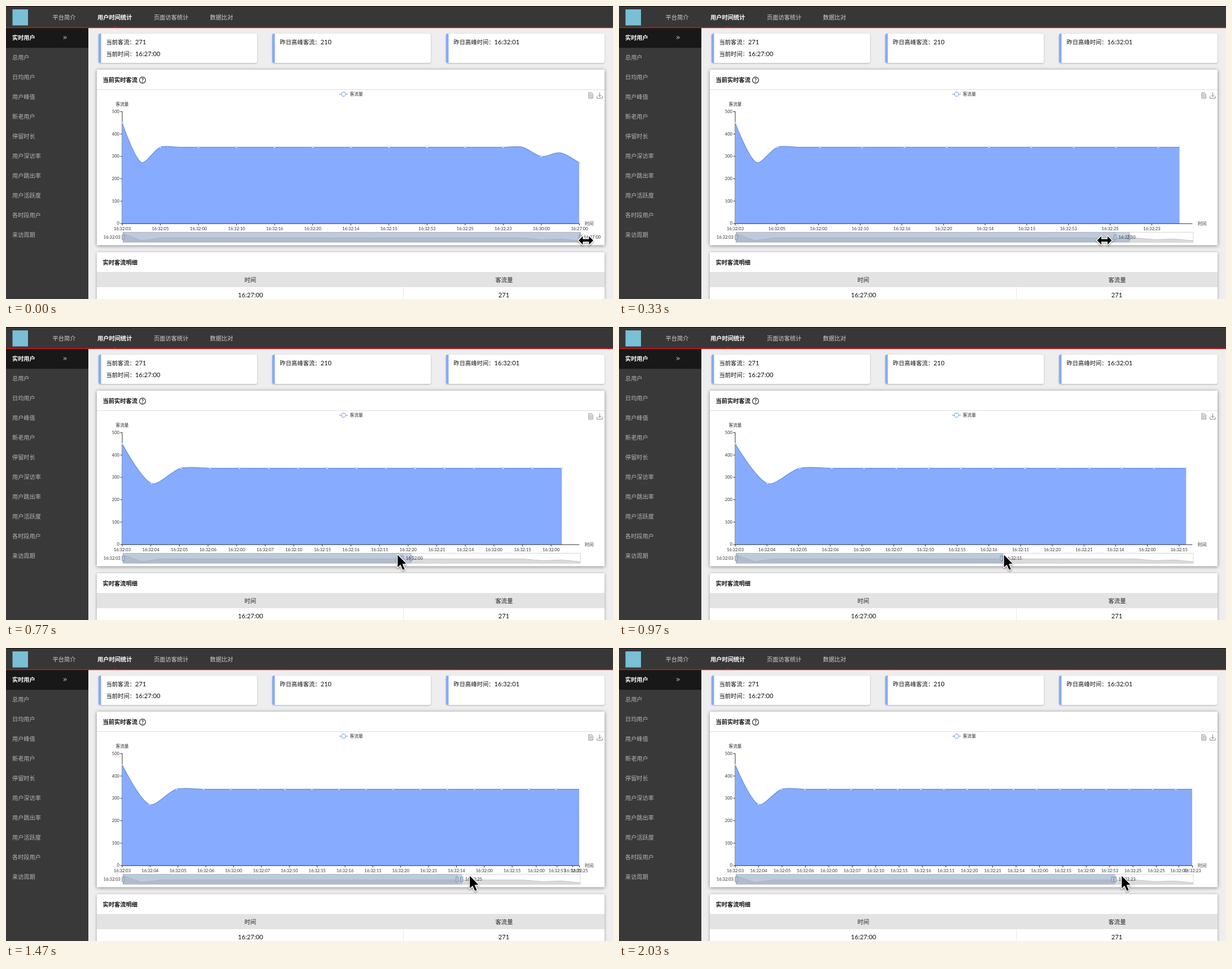
These frames come from a looping animation (1076 by 520 pixels, 2060 ms). An HTML page with a canvas:

```html
<!DOCTYPE html>
<html lang="zh">
<head>
<meta charset="utf-8">
<title>实时客流</title>
<style>
html, body { margin: 0; width: 100%; height: 100%; overflow: hidden; background: #eee; }
canvas { display: block; }
</style>
</head>
<body>
<canvas id="stage" width="1076" height="520"></canvas>
<script>
const ctx = document.getElementById('stage').getContext('2d');
const LOOP = 2060, FRAME = 100 / 3, FRAMES = 62;
const CJK = '"Noto Sans CJK SC", "Noto Sans CJK", sans-serif';
const NUM = 'Lato, sans-serif';

// Chart and slider geometry
const X0 = 206, W = 810.5, Y0 = 386, UNIT = 0.397, SMOOTH = 0.3;
const SX = 207, SW = 811, SY = 401, SH = 18.5;

// A steady flow with a dip after the first point and a fall at the end
const values = [450, 273, ...Array(20).fill(341), 300, 316, 271];
const LAST = values.length - 1;
const seconds = '03 04 05 06 00 07 10 15 16 11 20 21 14 00 15 00 53 25 25 00 23 10'.split(' ');
const times = seconds.map(s => '16:32:' + s).concat('16:30:00', '16:29:00', '16:27:00');

// The pointer drags the slider; the handle and then the chart trail behind it.
const drag = [
  { t: 0, x: 1028 }, { t: 330, x: 862 }, { t: 600, x: 745 }, { t: 770, x: 692 },
  { t: 1100, x: 674 }, { t: 1170, x: 713 }, { t: 1370, x: 807 }, { t: 1770, x: 865 }, { t: 2030, x: 890 },
];
const GRAB = 6, GRIP_DELAY = 50, CHART_DELAY = 100, ARROW_FROM = 480;

function pointerX(t) {
  const i = drag.findIndex(k => k.t > t);
  if (i < 0) return drag[drag.length - 1].x;
  if (i === 0) return drag[0].x;
  const a = drag[i - 1], b = drag[i];
  return a.x + (b.x - a.x) * (t - a.t) / (b.t - a.t);
}
const handleX = (t, delay) => Math.min(SX + SW, pointerX(t - delay) - GRAB);

// Points and axis labels ease towards the zoom window, labels more slowly.
function simulate() {
  const ease = tau => 1 - Math.exp(-FRAME / tau);
  const states = [];
  let gap = W / LAST, labels = times.map((_, i) => X0 + i * gap);
  for (let n = 0; n < FRAMES; n++) {
    const t = n * FRAME, grip = handleX(t, GRIP_DELAY), lag = handleX(t, CHART_DELAY);
    const last = Math.round((lag - SX) / SW * LAST);
    gap += (W / last - gap) * ease(75);
    const old = labels;
    labels = times.slice(0, last + 1).map((_, i) => {
      const end = X0 + i * W / last;
      return i < old.length ? old[i] + (end - old[i]) * ease(110) : end;
    });
    states.push({ t, grip, lag, last, gap, labels, step: last > 20 ? 2 : 1 });
  }
  return states;
}
const states = simulate();

function rect(x, y, w, h, fill) {
  ctx.fillStyle = fill;
  ctx.fillRect(x, y, w, h);
}

function line(points, color, width = 1) {
  ctx.beginPath();
  points.forEach(([x, y]) => ctx.lineTo(x, y));
  ctx.strokeStyle = color;
  ctx.lineWidth = width;
  ctx.stroke();
}

function circle(x, y, r, fill, stroke, width = 1) {
  ctx.beginPath();
  ctx.arc(x, y, r, 0, 7);
  if (fill) { ctx.fillStyle = fill; ctx.fill(); }
  ctx.strokeStyle = stroke;
  ctx.lineWidth = width;
  ctx.stroke();
}

// y is the vertical centre of the glyphs
function text(s, x, y, size, color, { align = 'left', font = CJK, weight = 400 } = {}) {
  ctx.font = `${weight} ${size}px ${font}`;
  ctx.textAlign = align;
  ctx.fillStyle = color;
  ctx.fillText(s, x, y + size * 0.37);
}
const num = (s, x, y, size, align, color = '#111') => text(s, x, y, size, color, { align, font: NUM });

function panel(x, y, w, h, radius, blur, shade) {
  ctx.save();
  ctx.shadowColor = shade;
  ctx.shadowBlur = blur;
  ctx.shadowOffsetY = 1;
  ctx.beginPath();
  ctx.roundRect(x, y, w, h, radius);
  ctx.fillStyle = '#fff';
  ctx.fill();
  ctx.restore();
}

function card(x, rows) {
  panel(x, 49, 281, 52, 3, 3, 'rgba(0,0,0,.25)');
  ctx.beginPath();
  ctx.roundRect(x, 49, 4.5, 52, [3, 0, 0, 3]);
  ctx.fillStyle = '#84a9ff';
  ctx.fill();
  rows.forEach(([name, value], i) => {
    const y = 64 + i * 20.7;
    text(name, x + 13.5, y, 10.3, '#111');
    num(value, x + 13.5 + name.length * 10.3, y, 11.2);
  });
}

function drawPage() {
  rect(0, 0, 1076, 520, '#eee');
  rect(0, 0, 146, 520, '#393939');
  rect(0, 0, 1076, 38, '#373737');
  rect(0, 0, 1076, 1, '#111');
  rect(0, 37.5, 1076, 1.7, '#d31414');
  ctx.beginPath();
  ctx.moveTo(189.5, 38); ctx.lineTo(193, 35.5); ctx.lineTo(196.5, 38);
  ctx.fillStyle = '#d31414';
  ctx.fill();
  rect(11.5, 6, 27.5, 28.5, '#79bfd6');

  const nav = [['平台简介', 82.5], ['用户时间统计', 162], ['页面访客统计', 262], ['数据比对', 361.5]];
  nav.forEach(([s, x], i) => text(s, x, 20, 10.25, i === 1 ? '#fff' : '#d0d0d0', { weight: i === 1 ? 700 : 400 }));

  rect(0, 39.2, 146, 35, '#181818');
  text('实时用户', 11, 56.5, 10.2, '#fff', { weight: 700 });
  for (const x of [102, 104.8]) line([[x, 53.5], [x + 2.3, 56], [x, 58.5]], '#eee', 1);
  '总用户 日均用户 用户峰值 新老用户 停留时长 用户深访率 用户跳出率 用户活跃度 各时段用户 来访周期'
    .split(' ').forEach((s, i) => text(s, 11, 91.5 + i * 35, 10.2, '#b4b4b4'));

  card(164, [['当前客流：', '271'], ['当前时间：', '16:27:00']]);
  card(472, [['昨日高峰客流：', '210']]);
  card(780, [['昨日高峰时间：', '16:32:01']]);

  panel(161, 113, 900, 311.5, 1, 6, 'rgba(0,0,0,.45)');
  text('当前实时客流', 171.5, 131, 10.25, '#111', { weight: 700 });
  circle(242, 131.5, 5.4, null, '#111', 1.1);
  text('?', 242, 131.5, 9, '#111', { align: 'center', font: NUM, weight: 700 });
  rect(161, 148, 900, 1, '#ddd');

  panel(161, 437, 900, 100, 1, 5, 'rgba(0,0,0,.35)');
  text('实时客流明细', 171.5, 455, 10.25, '#111', { weight: 700 });
  rect(161, 472, 900, 27, '#e3e3e3');
  rect(704, 499, 1, 21, '#eaeaea');
  text('时间', 433, 486, 10.3, '#222', { align: 'center' });
  text('客流量', 883, 486, 10.3, '#222', { align: 'center' });
  num('16:27:00', 433.5, 512.5, 11.2, 'center');
  num('271', 882.5, 512.5, 11.2, 'center');
}

function drawChartFrame() {
  line([[590.5, 156.5], [606, 156.5]], '#7ea5e4', 1.2);
  circle(598.3, 156.5, 3.8, '#fff', '#7ea5e4', 1.2);
  text('客流量', 609.5, 156.5, 7.7, '#333');
  text('客流量', 206, 174, 7.7, '#333', { align: 'center' });
  text('时间', 1026, 386, 7.7, '#333');

  // Toolbox: data sheet and download
  line([[1033, 154], [1038, 154], [1040.3, 156.3], [1040.3, 163.5], [1033, 163.5], [1033, 153.6]], '#777', 0.9);
  for (const y of [157, 159, 161]) line([[1034.5, y], [1038.8, y]], '#777', 0.8);
  line([[1052.5, 153.5], [1052.5, 161]], '#777', 0.9);
  line([[1049.5, 158], [1052.5, 161], [1055.5, 158]], '#777', 0.9);
  line([[1047.7, 160], [1047.7, 163.7], [1057.2, 163.7], [1057.2, 160]], '#777', 0.9);

  line([[206, 187], [206, Y0]], '#333');
  for (let v = 0; v <= 500; v += 100) {
    const y = Y0 - v * UNIT;
    line([[202.5, y], [206, y]], '#333');
    num(v, 201, y - 0.4, 7.6, 'right', '#333');
  }
}

// Each control handle follows the chord between the two neighbours.
function tracePath(points) {
  const dist = (a, b) => Math.hypot(b[0] - a[0], b[1] - a[1]);
  let out = points[0];
  ctx.lineTo(...out);
  for (let i = 1; i < points.length; i++) {
    const prev = points[i - 1], p = points[i], next = points[i + 1];
    let cin = p, cout = p;
    if (next) {
      const ratio = dist(p, next) / (dist(p, next) + dist(prev, p));
      const vx = (next[0] - prev[0]) * SMOOTH, vy = (next[1] - prev[1]) * SMOOTH;
      cin = [p[0] - vx * (1 - ratio), p[1] - vy * (1 - ratio)];
      cout = [p[0] + vx * ratio, p[1] + vy * ratio];
    }
    ctx.bezierCurveTo(...out, ...cin, ...p);
    out = cout;
  }
}

function drawSeries({ last, gap, labels, step }) {
  const points = values.slice(0, last + 1).map((v, i) => [X0 + i * gap, Y0 - v * UNIT]);
  ctx.save();
  ctx.beginPath();
  ctx.rect(X0 - 1, 180, W + 0.6, 210);
  ctx.clip();
  ctx.beginPath();
  tracePath(points);
  ctx.lineTo(points[last][0], Y0);
  ctx.lineTo(X0, Y0);
  ctx.fillStyle = '#87abff';
  ctx.fill();
  ctx.beginPath();
  tracePath(points);
  ctx.strokeStyle = '#6691e0';
  ctx.lineWidth = 1.2;
  ctx.stroke();
  ctx.restore();
  points.forEach(([x, y], i) => {
    if (i % step === 0 && x < X0 + W + 1) circle(x, y, 1.4, '#fff', '#8eb0ee', 0.7);
  });

  line([[X0 - 0.5, 386.3], [X0 + W, 386.3]], '#333');
  labels.forEach((x, i) => {
    if (i % step) return;
    line([[x, 386], [x, 389.5]], '#333');
    num(times[i], x, 394.7, 7.6, 'center', '#333');
  });
}

function drawGrip(x) {
  line([[x, SY], [x, SY + SH]], '#a3b3c9', 0.9);
  ctx.beginPath();
  ctx.roundRect(x - 2.2, 406, 4.4, 9, 1);
  ctx.fillStyle = '#a9b8cd';
  ctx.fill();
  ctx.strokeStyle = '#8195b0';
  ctx.lineWidth = 0.8;
  ctx.stroke();
  for (const y of [409, 412]) line([[x - 1.2, y], [x + 1.2, y]], '#e6ebf2', 0.8);
}

function drawSlider({ grip, lag, last }) {
  const near = Math.min(lag, grip), far = Math.max(lag, grip);
  rect(SX, SY, SW, SH, '#fff');
  const shadow = values.map((v, i) => [SX + SW * i / LAST, 416.5 - (v - 271) * 0.07]);
  ctx.beginPath();
  shadow.forEach(p => ctx.lineTo(...p));
  ctx.lineTo(SX + SW, SY + SH);
  ctx.lineTo(SX, SY + SH);
  ctx.fillStyle = '#dadada';
  ctx.fill();
  line(shadow, '#bfc3c8', 0.9);
  ctx.strokeStyle = '#d6d6d6';
  ctx.lineWidth = 1;
  ctx.strokeRect(SX + 0.5, SY + 0.5, SW - 0.5, SH - 0.5);
  rect(SX, SY, near - SX, SH, 'rgba(150,168,196,.62)');
  rect(near, SY, far - near, SH, 'rgba(150,168,196,.5)');
  for (const x of [SX + 0.8, lag, grip]) drawGrip(x);
  num(times[0], 203, 410.3, 7.6, 'right', '#333');
  num(times[last], grip + 6, 410.3, 7.6, 'left', '#333');
}

function drawPointer({ t }) {
  const arrow = [[1.2, 3], [1.2, 25], [6.2, 20.3], [10.3, 29.6], [13.6, 28.2], [9.6, 19], [16.4, 18.6]];
  const head = [[13, 0], [5.5, -7.5], [5.5, -2.2]];
  const flip = (sx, sy) => head.map(([x, y]) => [x * sx, y * sy]);
  const resize = [...head, ...flip(-1, 1).reverse(), ...flip(-1, -1), ...flip(1, -1).reverse()];
  const isArrow = t > ARROW_FROM;
  ctx.save();
  ctx.translate(pointerX(t), isArrow ? 401.5 : 416);
  ctx.beginPath();
  (isArrow ? arrow : resize).forEach(p => ctx.lineTo(...p));
  ctx.closePath();
  ctx.lineJoin = 'round';
  ctx.lineWidth = 3;
  ctx.strokeStyle = '#fff';
  ctx.shadowColor = 'rgba(0,0,0,.4)';
  ctx.shadowBlur = 3;
  ctx.shadowOffsetY = 1.5;
  ctx.stroke();
  ctx.shadowColor = 'transparent';
  ctx.fillStyle = '#000';
  ctx.fill();
  ctx.restore();
}

function draw(state) {
  drawPage();
  drawChartFrame();
  drawSeries(state);
  drawSlider(state);
  drawPointer(state);
}

const start = performance.now();
let shown = -1;
function tick() {
  const t = (performance.now() - start) % LOOP;
  const n = Math.min(FRAMES - 1, Math.floor((t + 5) / FRAME));
  if (n !== shown) draw(states[shown = n]);
  requestAnimationFrame(tick);
}
tick();
</script>
</body>
</html>
```
